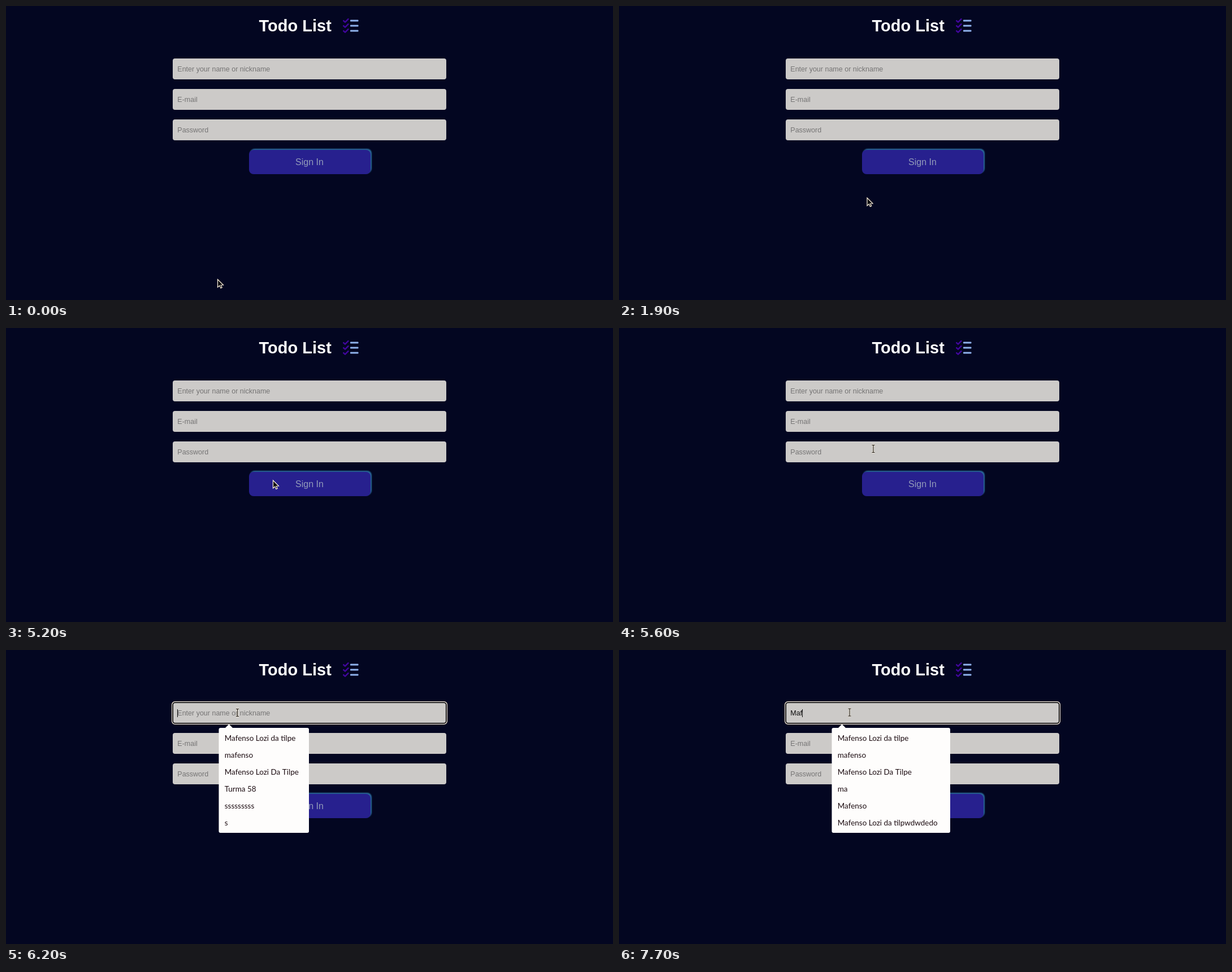
These frames come from a looping animation (1074 px wide and 521 px high, 8 s). An HTML page with a canvas:

```html
<!DOCTYPE html>
<html lang="en">
<head>
<meta charset="utf-8">
<title>Todo List sign in</title>
<style>
  html, body { margin: 0; width: 100%; height: 100%; overflow: hidden; background: #030621; }
  canvas { display: block; }
</style>
</head>
<body>
<canvas id="stage" width="1074" height="521"></canvas>
<script>
const ctx = document.getElementById('stage').getContext('2d');
const LOOP = 8000;
const SANS = '"Liberation Sans", Arial, sans-serif';
const MENU = 'Lato, "Open Sans", sans-serif';
const CREAM = '#fff3dc';

// Pointer stops: time, x, y, shape
const pointer = [
  [0, 374.5, 484.5, arrow],
  [1500, 374.5, 477, arrow],
  [1600, 381, 456, arrow],
  [1700, 396, 421, arrow],
  [1800, 418, 378, arrow],
  [1900, 439, 340, arrow],
  [2000, 455.5, 311.5, arrow],
  [2200, 466, 300, arrow],
  [2300, 478.7, 281.7, forbidden],
  [5200, 472.5, 270, arrow],
  [5300, 465, 251, arrow],
  [5400, 459.5, 237, beam],
  [5600, 450, 214, beam],
  [5700, 425, 140, arrow],
  [5800, 405.5, 81.5, arrow],
  [6100, 409.5, 111, beam],
  [6400, 408.5, 110.5, beam],
  [6500, 408, 110.5, beam]
];

const typing = [[0, ''], [7200, 'M'], [7400, 'Ma'], [7700, 'Maf']];
const FOCUS = 6200, CARET_OFF = 6800, FILTER = 7400;

const names = ['Mafenso Lozi da tilpe', 'mafenso', 'Mafenso Lozi Da Tilpe'];
const recent = [...names, 'Turma 58', 'sssssssss', 's'];
const matches = [...names, 'ma', 'Mafenso', 'Mafenso Lozi da tilpwdwdedo'];

const at = (keys, t) => keys.findLast(k => k[0] <= t);

function box(x, y, w, h, r) {
  ctx.beginPath();
  ctx.roundRect(x, y, w, h, r);
}

function fillBox(x, y, w, h, r, color) {
  ctx.fillStyle = color;
  box(x, y, w, h, r);
  ctx.fill();
}

function strokeBox(x, y, w, h, r, color, width) {
  ctx.strokeStyle = color;
  ctx.lineWidth = width;
  box(x, y, w, h, r);
  ctx.stroke();
}

function text(str, x, y, font, color, align = 'left') {
  ctx.font = font;
  ctx.fillStyle = color;
  ctx.textAlign = align;
  ctx.fillText(str, x, y);
}

function trace(points) {
  ctx.beginPath();
  points.forEach(([x, y]) => ctx.lineTo(x, y));
}

// Dark shape with a light rim
function rimmed(rim, core) {
  ctx.strokeStyle = CREAM;
  ctx.lineWidth = rim;
  ctx.stroke();
  ctx.strokeStyle = '#0b0b10';
  ctx.lineWidth = core;
  ctx.stroke();
}

function arrow() {
  trace([[0, 0], [0, 14], [3.3, 11], [5.4, 15.4], [7.7, 14.4], [5.7, 10.2], [10, 10]]);
  ctx.closePath();
  ctx.fillStyle = '#0b0b10';
  ctx.fill();
  ctx.strokeStyle = CREAM;
  ctx.lineWidth = 1.2;
  ctx.stroke();
}

function beam() {
  ctx.beginPath();
  ctx.moveTo(0, -6);
  ctx.lineTo(0, 6);
  for (const y of [-6.5, 6.5]) {
    ctx.moveTo(-2.5, y);
    ctx.lineTo(2.5, y);
  }
  rimmed(2.4, 1.1);
}

function forbidden() {
  ctx.beginPath();
  ctx.arc(0, 0, 5.4, 0, Math.PI * 2);
  ctx.moveTo(-3.6, 3.6);
  ctx.lineTo(3.6, -3.6);
  rimmed(4.4, 2.4);
}

function header() {
  text('Todo List', 447.5, 45, `bold 29px ${SANS}`, '#fff');
  ctx.lineCap = ctx.lineJoin = 'round';
  for (const y of [26, 35, 44]) {
    fillBox(609, y - 1.5, 14.5, 3, 0.8, '#8fb2ec');
    trace([[597.3, y + 0.2], [600, y + 2.6], [605.5, y - 2.8]]);
    ctx.strokeStyle = '#40069c';
    ctx.lineWidth = 2.5;
    ctx.stroke();
  }
  ctx.lineCap = 'butt';
  ctx.lineJoin = 'miter';
}

function field(y, hint, value = '') {
  fillBox(295, y, 484, 37, 4, '#cccac8');
  text(value || hint, 303.3, y + 23, `12.5px ${SANS}`, value ? '#0a0a0a' : '#757474');
}

function button() {
  ctx.save();
  ctx.shadowColor = '#2a6a9c';
  ctx.shadowOffsetX = 2;
  ctx.shadowOffsetY = -2;
  ctx.shadowBlur = 2;
  fillBox(430, 255, 215, 43, 8, '#27208e');
  ctx.restore();
  text('Sign In', 537, 282, `16px ${SANS}`, '#939cba', 'center');
}

function focusRing() {
  strokeBox(293.8, 91.8, 486.4, 39.4, 5, CREAM, 1.5);
  strokeBox(295.2, 93.2, 483.6, 36.6, 4, '#08080c', 1.6);
}

function caret(value) {
  ctx.font = `12.5px ${SANS}`;
  ctx.fillStyle = '#0a0a0a';
  ctx.fillRect(Math.round(303 + ctx.measureText(value).width), 105, 1, 14);
}

function menu(items, width) {
  fillBox(376.5, 138, width, 186, 3, '#fefdfc');
  trace([[387.5, 138.5], [394.5, 131.5], [401.5, 138.5]]);
  ctx.fill();
  items.forEach((item, i) => text(item, 386.7, 161 + i * 30, `13.5px ${MENU}`, '#1d0d12'));
}

function draw(t) {
  const value = at(typing, t)[1];
  ctx.fillStyle = '#030621';
  ctx.fillRect(0, 0, 1074, 521);
  header();
  field(93, 'Enter your name or nickname', value);
  field(147, 'E-mail');
  field(201, 'Password');
  button();

  if (t >= FOCUS) {
    focusRing();
    if (t < CARET_OFF || value) caret(value);
    if (t < FILTER) menu(recent, 159.5);
    else menu(matches, 209.5);
  }

  const [, x, y, shape] = at(pointer, t);
  ctx.save();
  ctx.translate(x, y);
  shape();
  ctx.restore();
}

function tick() {
  draw(performance.now() % LOOP);
  requestAnimationFrame(tick);
}
tick();
</script>
</body>
</html>
```
